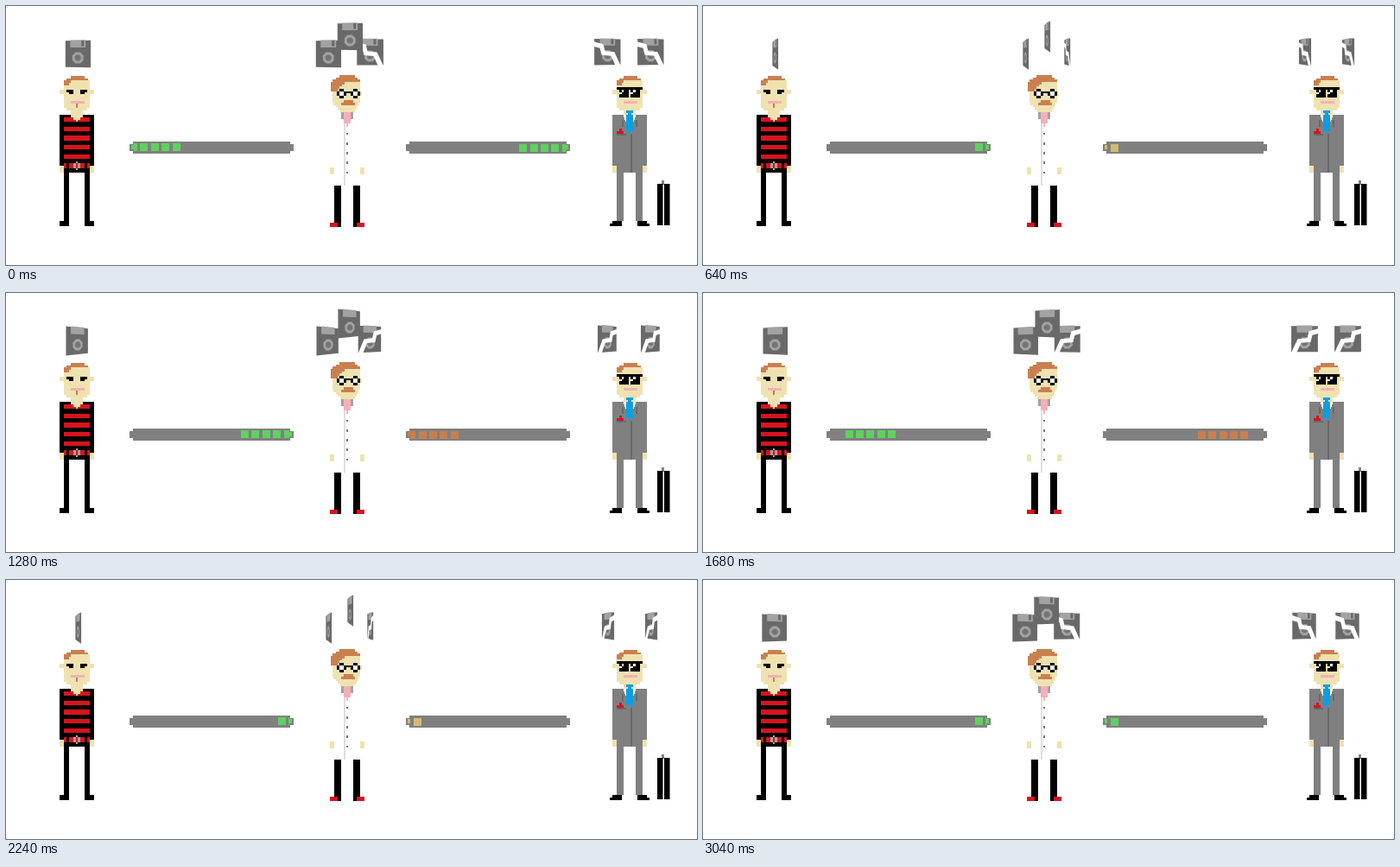
An HTML page with a canvas that plays this animation: 800x300 px, repeating every 3120 ms.

```html
<!DOCTYPE html>
<html>
<head>
<meta charset="utf-8">
<style>
html, body { margin: 0; width: 100%; height: 100%; overflow: hidden; background: #fff; }
canvas { display: block; }
</style>
</head>
<body>
<canvas id="stage" width="800" height="300"></canvas>
<script>
const ctx = document.getElementById('stage').getContext('2d');
const STEP = 80, STEPS = 39, CYCLE = 40, RUN = 10;
const SKIN = '#f0e2b0', HAIR = '#c9804f', PINK = '#f4b0b8', RED = '#d6141f';
const BLACK = '#000', WHITE = '#fff', GREY = '#808080', DARK = '#696969', LIGHT = '#a2a2a2';
const GREEN = '#5fd160', TAN = '#d2bb70', ORANGE = '#c97e4e';

function rect(color, x, y, w, h) {
  ctx.fillStyle = color;
  ctx.fillRect(x, y, w, h);
}

// Figures are built on a coarse grid, 15 cells wide
const CELL = 2.67, WIDE = 15;
let left, top_;

function at(x, y) {
  left = x;
  top_ = y;
}

function box(color, x, y, w, h) {
  const snap = (origin, n) => Math.round(origin + n * CELL);
  const l = snap(left, x), t = snap(top_, y);
  rect(color, l, t, snap(left, x + w) - l, snap(top_, y + h) - t);
}

function pair(color, x, y, w, h) {
  box(color, x, y, w, h);
  box(color, WIDE - x - w, y, w, h);
}

// Rows whose two ends move by dl and dr from one row to the next
function taper(color, x, y, w, rows, dl, dr) {
  for (let i = 0; i < rows; i++) box(color, x + i * dl, y + i, w + i * (dr - dl), 1);
}

function head() {
  box(SKIN, 2, 2, 11, 12);
  box(SKIN, 3, 14, 9, 1);
  box(SKIN, 5, 15, 5, 2);
  pair(SKIN, 0, 6, 2, 2);
  taper(HAIR, 5, 0, 6, 2, -2, 1.5);
  taper(HAIR, 2, 2, 3, 2, 0, -1);
  box(PINK, 5, 11, 6, 1);
}

function torso(color) {
  box(color, 0, 17, WIDE, 22);
  box(color, 2, 39, 11, 3);
  pair(SKIN, 0, 39, 2, 3);
}

function rocker() {
  at(62, 81);
  torso(BLACK);
  for (let i = 0; i < 5; i++) box(RED, 2, 18 + 4 * i, 11, 2);
  head();
  taper(SKIN, 5, 17, 5, 3, 1, -1);
  pair(BLACK, 3, 6, 3, 1);
  pair(BLACK, 4, 7, 2, 1);
  box(HAIR, 7, 12, 1, 2);
  pair(RED, 2, 38, 1, 2);
  pair(RED, 4, 38, 2, 2);
  box(LIGHT, 6, 38, 3, 2);
  box(LIGHT, 7, 37, 1, 4);
  box(RED, 7, 38, 1, 2);
  pair(BLACK, 2, 42, 2, 23);
  pair(BLACK, 0, 63, 4, 2);
}

function scientist() {
  at(375, 80);
  box(SKIN, 1, 3, 12, 9);
  taper(SKIN, 1.5, 12, 11, 4, 1, -0.5);
  box(SKIN, 13, 7, 1, 2);
  taper(HAIR, 4, 0, 7, 3, -1.5, 1);
  taper(HAIR, 0.3, 3, 6, 4, 0, -1);
  for (const x of [3, 9]) {
    box(BLACK, x, 7, 4, 2);
    box(BLACK, x + 1, 6, 2, 4);
    box(WHITE, x + 1, 7, 2, 2);
  }
  box(BLACK, 7, 7, 2, 1);
  taper(HAIR, 6, 11, 4, 2, -1, 1);
  box(LIGHT, 5, 16, 5, 3);
  box(PINK, 6, 16, 3, 5);
  box(PINK, 7, 21, 1, 1.5);
  box('#dedede', 6, 21, 0.8, 27);
  for (let i = 0; i < 5; i++) box('#777', 7, 25 + 4.2 * i, 1, 1);
  pair(SKIN, 0, 40, 2, 3);
  pair(BLACK, 2, 48, 3, 18);
  pair(RED, 0, 64, 3.5, 2);
}

function banker() {
  at(702, 81);
  torso(GREY);
  head();
  taper(WHITE, 5, 17, 5, 4, 0.4, -0.4);
  pair(DARK, 4, 19, 1, 3);
  taper('#0a9fe2', 6, 15, 3, 2, 0.8, -0.8);
  box('#0a9fe2', 6, 17, 3, 7);
  box('#0a9fe2', 7, 24, 1, 1);
  box(DARK, 8, 25, 0.7, 17);
  taper(RED, 3, 23, 1, 2, -1, 1);
  box(DARK, 2, 25, 4, 0.7);
  box(BLACK, 2, 5, 11, 1);
  pair(BLACK, 3, 6, 4, 3.5);
  for (const x of [4, 9]) taper(WHITE, x, 6, 1, 2, -1, -1);
  pair(GREY, 2, 42, 3, 21);
  pair(BLACK, 0, 63, 4, 2);
  pair(BLACK, -1, 64, 1, 1);
}

function briefcase() {
  rect(GREY, 759, 202, 3, 5);
  for (const x of [754, 762]) rect(BLACK, x, 206, 6.5, 48);
}

function bar(x, y, first, color) {
  rect(GREY, x + 4, 157, 182, 14);
  rect(GREY, x, 160, 190, 8);
  ctx.save();
  ctx.beginPath();
  ctx.rect(x + 5, y, 180, 9);
  ctx.rect(x + 2, 161, 186, 5);
  ctx.clip();
  for (let i = 0; i < 5; i++) rect(color, Math.round(first + i * 12.4), y, 9, 9);
  ctx.restore();
}

// A flat disk turned about its upright axis, in perspective
function disk(cx, cy, angle, broken) {
  const half = broken ? 15.4 : 14.7, tall = broken ? 15 : 15.5;
  const depth = (broken ? 0.08 : 0.16) / half;
  const cos = Math.cos(angle), sin = Math.sin(angle);
  const shape = (color, points) => {
    ctx.fillStyle = color;
    ctx.beginPath();
    for (const [u, v] of points) {
      const zoom = 1 / (1 - depth * u * sin);
      ctx.lineTo(cx + u * cos * zoom, cy + v * zoom);
    }
    ctx.fill();
  };
  const panel = (color, l, t, r, b) => shape(color, [[l, t], [r, t], [r, b], [l, b]]);
  const round = (color, r) => shape(color, Array.from({ length: 8 }, (_, i) => {
    const a = (i + 0.5) * Math.PI / 4;
    return [r * Math.cos(a), 4.5 + r * Math.sin(a)];
  }));
  panel(DARK, -half, -tall, half, tall);
  panel(LIGHT, -9, -tall - 0.7, 9, -7.5);
  if (cos > 0) panel(DARK, 4, -tall, 7, -9);
  round(LIGHT, 7);
  round('#747474', 3.8);
  if (broken) {
    const crack = [[-16, -12], [-5, -9], [-3, -1], [8, 0], [15.5, 16]];
    const far = crack.map(([u, v]) => [u - 4, v + 4.5]).reverse();
    shape(WHITE, [...crack, ...far]);
  }
}

function draw(k) {
  rect(WHITE, 0, 0, 800, 300);
  rocker();
  scientist();
  banker();
  briefcase();

  const turn = k / CYCLE * 2 * Math.PI;
  const a = turn + 0.09, b = turn - 0.16;
  disk(83.2, 55.5, a);
  disk(373.2, 55.5, a);
  disk(421.5, 53.5, a, true);
  disk(398.2, 35.5, a);
  for (const x of [696.5, 746.5]) disk(x, 53.3, b, true);

  const shift = 21.5 * (k % RUN);
  bar(143, 159, 143 + shift, GREEN);
  bar(463, 160, 594.2 - shift, [GREEN, TAN, ORANGE, TAN, GREEN][Math.floor(k / 8)]);
}

const start = performance.now();
function tick() {
  draw(Math.floor((performance.now() - start) / STEP) % STEPS);
  requestAnimationFrame(tick);
}
tick();
</script>
</body>
</html>
```
